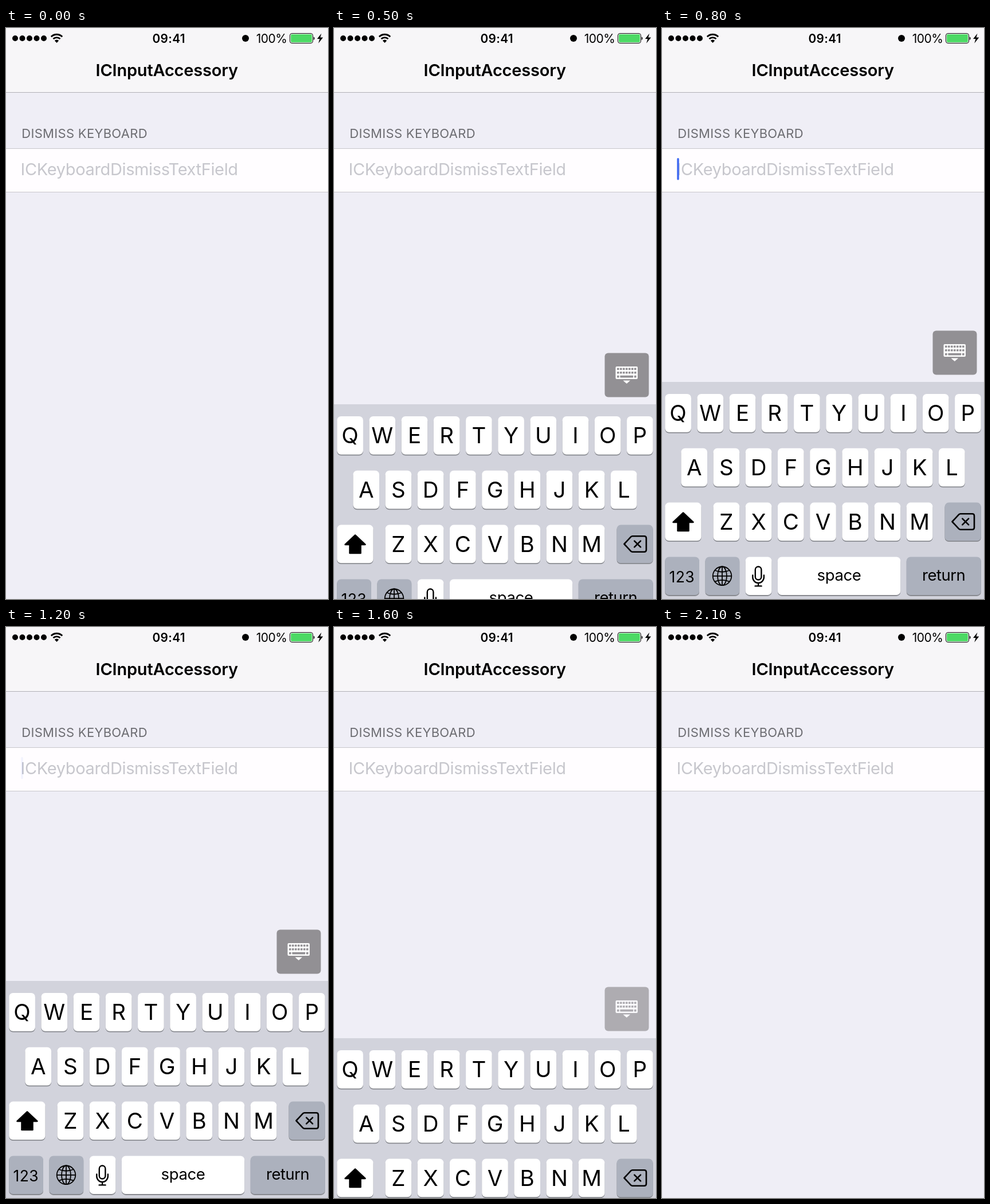
Write an HTML page that moves like this. It is 562x997 px and loops after 2.7 s.

```html
<!DOCTYPE html>
<html lang="en">
<head>
<meta charset="utf-8">
<title>Dismiss keyboard</title>
<style>
  html, body { margin: 0; width: 100%; height: 100%; overflow: hidden; background: #efeef6; }
  svg { display: block; width: 100vw; height: 100vh; }
  text { font-family: Inter, Roboto, "Liberation Sans", sans-serif; font-optical-sizing: none; }
  .mid { text-anchor: middle; }
  .line { fill: none; stroke: #000; stroke-linecap: round; stroke-linejoin: round; }
</style>
</head>
<body>
<svg viewBox="0 0 562 997" preserveAspectRatio="none">
  <rect width="562" height="997" fill="#efeef6"/>

  <!-- Navigation and status bar -->
  <rect width="562" height="112" fill="#f7f6f8"/>
  <rect y="112" width="562" height="1" fill="#b2b1b6"/>
  <path d="M16 18h50.1" stroke="#000" stroke-width="10" stroke-linecap="round" stroke-dasharray="0 12.5"/>
  <g fill="none" stroke="#000" stroke-width="2.9">
    <path d="M78.8 15.2a14 14 0 0 1 19.4 0"/>
    <path d="M82.5 19a8.7 8.7 0 0 1 12 0"/>
  </g>
  <path d="M88.5 26l-3.7-4a5.2 5.2 0 0 1 7.4 0z"/>
  <text class="mid" x="284.2" y="25.5" font-size="20.8" font-weight="600" letter-spacing=".4">09:41</text>
  <circle cx="418" cy="18" r="6"/>
  <text x="490.5" y="25.5" font-size="21" text-anchor="end" letter-spacing="-.5">100%</text>
  <rect x="495.5" y="9.5" width="40" height="17" rx="3.5" fill="#fff" stroke="#000"/>
  <rect x="497" y="11" width="37" height="14" rx="2" fill="#4cd964"/>
  <path d="M536.8 15.2q1.8 .6 1.8 2.9t-1.8 2.9z"/>
  <path d="M550.5 9.5l-7.5 9.6h4.5l-2.3 7.6 8.1-10.2h-4.8z"/>
  <text class="mid" x="280.7" y="84" font-size="29" font-weight="600" letter-spacing="-.2">ICInputAccessory</text>

  <!-- Text field -->
  <text x="27.3" y="192" font-size="22" fill="#6d6d72" letter-spacing=".3">DISMISS KEYBOARD</text>
  <rect y="210" width="562" height="77" fill="#c8c7cc"/>
  <rect y="211" width="562" height="75" fill="#fffdff"/>
  <text x="25.5" y="257" font-size="29" fill="#c7c7cd" letter-spacing="-.36">ICKeyboardDismissTextField</text>
  <rect id="caret" x="26.2" y="227" width="3.6" height="38.5" rx="1.8" fill="#426bf2"/>

  <g id="panel">
    <g id="button">
      <rect x="472.5" y="528.5" width="77" height="77" rx="6" fill="#929094"/>
      <g id="icon"></g>
    </g>
    <rect y="618" width="562" height="379" fill="#d2d3dc"/>
    <g id="keys"></g>

    <path d="M37 846.5L54.5 863H46.5V878H27.5V863H19.5Z" stroke="#000" stroke-width="2.5" stroke-linejoin="round"/>
    <g class="line" stroke-width="2.6">
      <path d="M506.5 862l11.5-12.4q1.2-1.3 3-1.3h20.5q3.5 0 3.5 3.5v20.4q0 3.5-3.5 3.5H521q-1.8 0-3-1.3z"/>
      <path d="M524.3 856.6l10.8 10.8m0-10.8l-10.8 10.8"/>
    </g>
    <g class="line" stroke-width="1.8">
      <circle cx="105" cy="956.8" r="16.3"/>
      <ellipse cx="105" cy="956.8" rx="8" ry="16.3"/>
      <path d="M105 940.5v32.6M88.7 956.8h32.6M92.3 947q12.7 5.5 25.4 0M92.3 966.6q12.7-5.5 25.4 0"/>
    </g>
    <g class="line" stroke-width="2.4">
      <rect x="162.8" y="940.5" width="10.6" height="23" rx="5.3"/>
      <path d="M158.3 955.5v3.6a9.8 9.8 0 0 0 19.6 0v-3.6M168.1 969v5.2M162.6 974.4h11"/>
    </g>
    <g class="mid">
      <text x="34.8" y="967.5" font-size="26.5" letter-spacing=".4">123</text>
      <text x="309" y="964.7" font-size="27.5" letter-spacing="-.4">space</text>
      <text x="491.7" y="964.7" font-size="27.5" letter-spacing="-.5">return</text>
    </g>
  </g>
</svg>
<script>
const $ = id => document.getElementById(id);
const PT = 562 / 320, LOOP = 2700, STEP = 100, HEIGHT = 379;
const SHOW = 400, HIDE = 1600, PRESS = 1400, FOCUS = 560;

const rect = (x, y, w, h, r, fill) =>
  `<rect x="${x}" y="${y}" width="${w}" height="${h}" rx="${r}" fill="${fill}"/>`;

// Key positions and widths are in points, 320 across the screen.
function key(row, x, w, label = '', fill = '#fff') {
  const y = 639 + row * 94.8, left = x * PT, width = w * PT;
  return rect(left, y + 1.8, width, 66.7, 7, '#888a90') +
    rect(left, y, width, 66.7, 7, fill) +
    `<text class="mid" x="${left + width / 2}" y="${y + 47}" font-size="38.5">${label}</text>`;
}

const GRAY = '#acb1bd';
const letters = [['QWERTYUIOP', 3], ['ASDFGHJKL', 19], ['ZXCVBNM', 51]];
$('keys').innerHTML =
  letters.map(([row, x], r) => [...row].map((c, i) => key(r, x + i * 32, 26, c)).join('')).join('') +
  key(2, 3, 36) + key(2, 281, 36, '', GRAY) +
  key(3, 3, 34, '', GRAY) + key(3, 43, 34, '', GRAY) + key(3, 83, 26) +
  key(3, 115, 122) + key(3, 243, 74, '', GRAY);

function drawIcon() {
  const hole = (x, y, w) => rect(x, y, w, 3.6, .4, '#929094');
  let s = rect(491.5, 552, 38.5, 22, 2, 'currentColor');
  for (let i = 0; i < 7; i++) s += hole(494 + i * 5, 554.4, 3.6) + hole(494 + i * 5, 561, 3.6);
  s += hole(494, 567.8, 3.6) + hole(499.4, 567.8, 22.8) + hole(524, 567.8, 3.6);
  $('icon').innerHTML = s + '<path d="M504.5 576.5h12.6l-6.3 5.6z" fill="currentColor"/>';
}
drawIcon();

// Critically damped spring: share of the way still to go after ms.
const spring = ms => {
  const u = ms * .0181;
  return (1 + u) * Math.exp(-u);
};

function caretAlpha(t) {
  if (t < FOCUS || t >= HIDE) return 0;
  const p = (t - FOCUS) % 1000 / 1000;
  if (p < .5) return 1;
  return Math.max(0, 1 - (p - .5) / .15, (p - .85) / .15);
}

function draw() {
  const t = Math.floor(performance.now() % LOOP / STEP) * STEP;
  const shown = t < SHOW ? 0 : t < HIDE ? 1 - spring(t - 287) : spring(t - 1545);
  const drop = Math.round(HEIGHT * (1 - shown));
  $('panel').setAttribute('transform', `translate(0 ${drop})`);
  $('button').setAttribute('opacity', t < HIDE ? +(t >= SHOW) : (1 - drop / HEIGHT) ** 1.2);
  $('icon').style.color = t >= PRESS && t < HIDE ? '#868488' : '#fff';
  $('caret').setAttribute('opacity', caretAlpha(t));
  requestAnimationFrame(draw);
}
draw();
</script>
</body>
</html>
```
